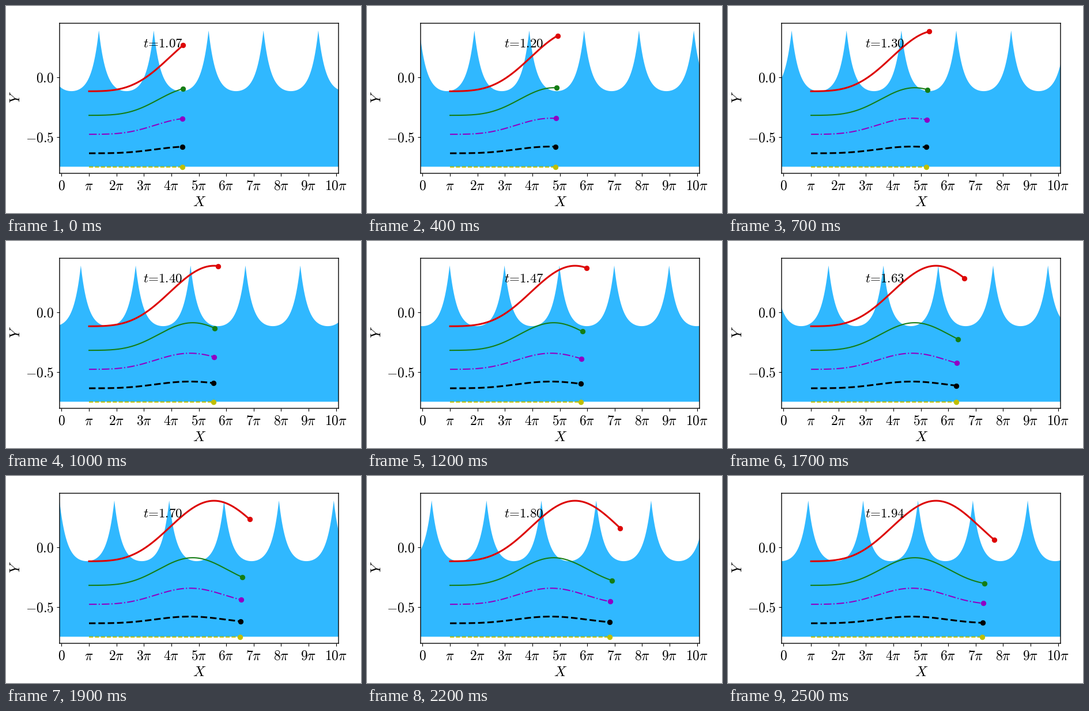
A matplotlib script for the animation above (2.6 s loop, 616 by 360 pixels).

```python
import numpy as np
import matplotlib.pyplot as plt
from matplotlib.animation import FuncAnimation

plt.rcParams["mathtext.fontset"] = "cm"

W, H = 616, 360
FRAMES, INTERVAL = 26, 100
T_START, T_STEP = 1.07, 0.01
STEP_MS, LAST_STEP = 30, 87
FLOOR = -0.745
TICK_SIZE, LABEL_SIZE = 17, 18

fig = plt.figure(figsize=(W / 100, H / 100), dpi=100, facecolor="white")
LEFT, RIGHT, TOP, BOTTOM = 93, 577, 30, 291
ax = fig.add_axes([LEFT / W, 1 - BOTTOM / H, (RIGHT - LEFT) / W, (BOTTOM - TOP) / H])

# Horizontal positions are in multiples of pi.
X_MIN, X_MAX = -0.0735, 10.0945
ax.set_xlim(X_MIN, X_MAX)
ax.set_ylim(-0.8, 0.45)
ax.set_xticks(range(11), [""] * 11)
ax.set_yticks([0, -0.5], ["", ""])
for spine in ax.spines.values():
    spine.set_snap(False)
    spine.set_linewidth(1)


def label(x, y, text, size=TICK_SIZE, ha="center", **kw):
    """Text with its baseline at pixel (x, y) from the top left."""
    return fig.text(x / W, 1 - y / H, text, size=size, ha=ha, va="baseline", **kw)


for k in range(11):
    number = "0" if k == 0 else r"\pi" if k == 1 else rf"{k}\pi"
    label(96.4 + 47.6 * k, 319, f"${number}$")
label(82.7, 132.6, "$0.0$", ha="right")
label(82.7, 236.8, "$-0.5$", ha="right")
label(336, 348.2, "$X$", LABEL_SIZE)
label(23.8, 158.6, "$Y$", LABEL_SIZE, rotation=90, rotation_mode="anchor")
clock = label(238.5, 72.3, "", 16.6, ha="left")

grid = np.linspace(X_MIN, X_MAX, 2400)
water, = ax.fill([0, 0, 0], [0, 0, 0], color="#30b8ff", lw=0, zorder=1)


class Particle:
    """A drifting particle whose path peaks at x = peak, time = t_peak."""

    def __init__(self, y0, rise, power, peak, t_peak, sway, sway2, color, style, lw):
        self.y0, self.rise, self.power = y0, rise, power
        self.peak, self.t_peak = peak, t_peak
        self.sway, self.sway2 = sway, sway2
        self.path, = ax.plot([], [], style, color=color, lw=lw)
        self.dot, = ax.plot([], [], "o", color=color, ms=6, mew=0.7, zorder=2.2)

    def position(self, t):
        half = self.peak - 1
        u = t / self.t_peak - 1
        x = (self.peak + half * u + self.sway * np.sin(np.pi * u)
             + self.sway2 * np.sin(2 * np.pi * u))
        bump = np.cos(np.pi / 2 * (x - self.peak) / half) ** 2
        return x, self.y0 + self.rise * (0.1 * bump + 0.9 * bump ** self.power)

    def move(self, t):
        x, y = self.position(np.linspace(0, t, 300))
        self.path.set_data(x, y)
        self.dot.set_data(x[-1:], y[-1:])


particles = [
    Particle(-0.1165, 0.504, 1.86, 5.556, 1.362, 0.172, 0.042, "#dd0505", "-", 2.2),
    Particle(-0.317, 0.230, 2.09, 4.780, 1.169, 0.076, 0.017, "#147d14", "-", 1.5),
    Particle(-0.475, 0.134, 1.93, 4.685, 1.149, 0.080, 0.017, "#9000c4", "-.", 1.5),
    Particle(-0.633, 0.056, 1.90, 4.674, 1.149, 0.078, 0.017, "black", "--", 2.2),
    Particle(FLOOR, 0, 1, 4.670, 1.149, 0.076, 0.017, "#bfbf00", "--", 1.4),
]


def surface(t):
    crest = 1.358 + 4.07 * (t - T_START)
    from_trough = (grid - crest) % 2 - 1
    k = 3.8
    return -0.1155 + 0.506 * (np.cosh(k * from_trough) - 1) / (np.cosh(k) - 1)


def update(frame):
    # Time advances in 30 ms steps; the loop closes on the final one.
    step = LAST_STEP if frame == FRAMES - 1 else frame * INTERVAL // STEP_MS
    t = T_START + T_STEP * step
    xs = np.r_[grid, X_MAX, X_MIN]
    ys = np.r_[surface(t), FLOOR, FLOOR]
    water.set_xy(np.column_stack([xs, ys]))
    for particle in particles:
        particle.move(t)
    clock.set_text(rf"$t\hspace{{-0.2}}=\hspace{{-0.2}}{t:.2f}$")


anim = FuncAnimation(fig, update, frames=FRAMES, interval=INTERVAL,
                     repeat=True, repeat_delay=0, blit=False)
plt.show()
```
